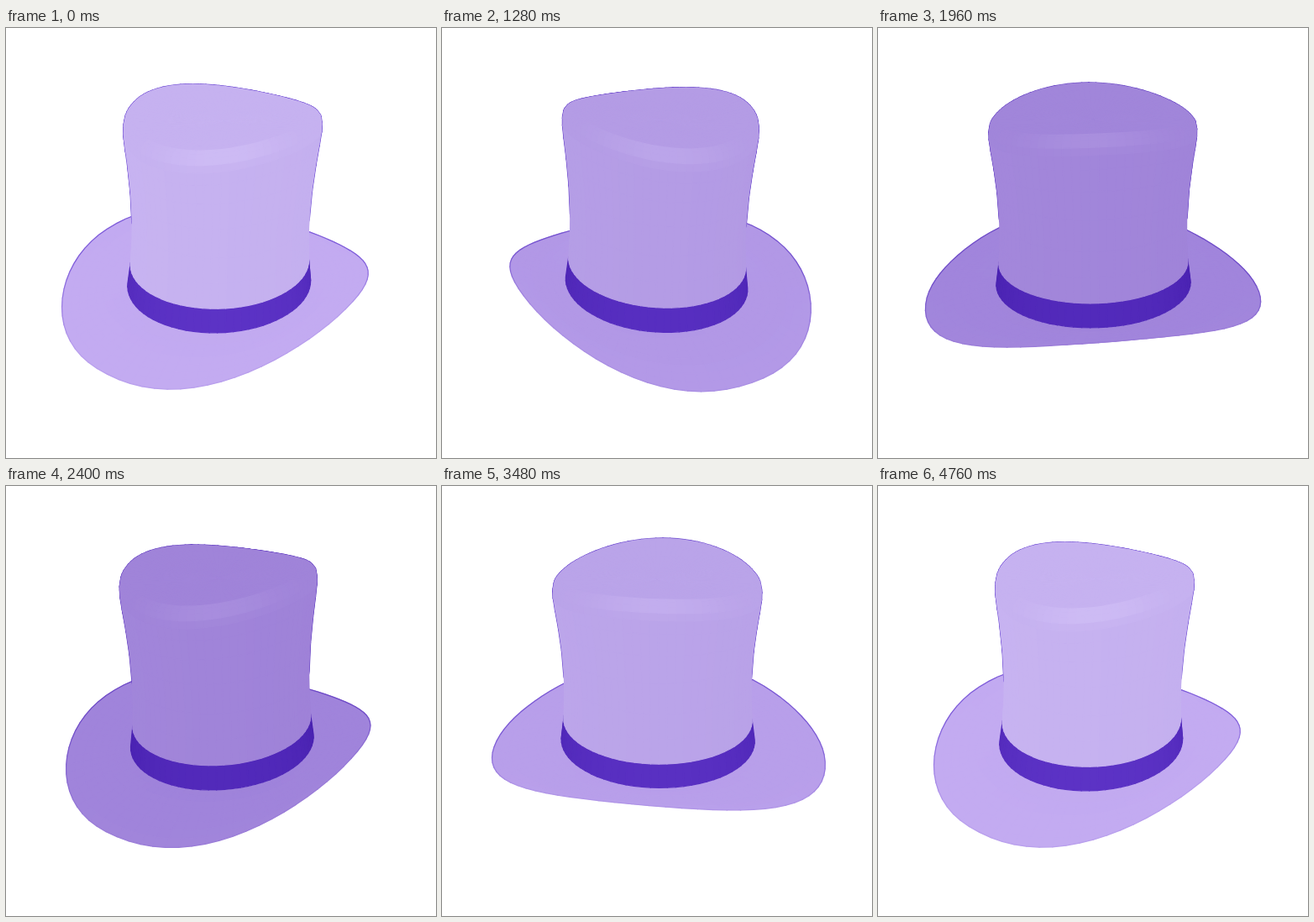
These frames come from a looping animation (512 by 512 pixels, 4.8 s). An HTML page with a canvas:

```html
<!DOCTYPE html>
<html lang="en">
<head>
<meta charset="utf-8">
<title>Turning hat</title>
<style>
html, body { margin: 0; width: 100%; height: 100%; overflow: hidden; background: #fff; }
canvas { display: block; width: 512px; height: 512px; }
</style>
</head>
<body>
<canvas id="stage" width="512" height="512"></canvas>
<script>
const ctx = document.getElementById('stage').getContext('2d');
const FRAME = 40, FRAMES = 120, SEGS = 80;
const DIST = 900, TILT = 28 * Math.PI / 180, LEAN = .0255, PIVOT = 30;
const sinT = Math.sin(TILT), cosT = Math.cos(TILT);
const CROWN = { front: 117.8, side: 107.7, bend: 6.8 };
const BRIM = { front: 203, side: 168, low: -67, rise: 40 };

// Crown profile: relative radius, height, share of the saddle bend.
const PROFILE = [
  [1, -49, 0], [.96, -20.5, 0], [.935, 10, 0], [.923, 40, 0], [.926, 75, .25],
  [.942, 105, .6], [.96, 128, .85], [.969, 142, 1], [.966, 150, 1], [.952, 156.5, 1],
  [.925, 160, 1], [.88, 161, .9], [.75, 158.5, .65], [.55, 155, .35], [.3, 152, .1], [0, 151, 0]
];
const BAND_ROWS = 1, SIDE_ROWS = 7, RIM_ROWS = 11, BRIM_ROWS = 8;

const mix = (a, b, t) => a.map((v, i) => v + (b[i] - v) * t);
const css = c => 'rgb(' + c.map(v => Math.round(Math.max(0, Math.min(255, v)))) + ')';
const TONES = {
  crown: [[160, 132, 217], [198, 178, 240]],
  brim: [[160, 132, 219], [195, 171, 241]],
  band: [[78, 38, 182], [88, 47, 193]],
  line: [[104, 68, 196], [116, 82, 214]]
};

function project(x, near, z) {
  const d = DIST - near * cosT - z * sinT;
  return { x: 256.5 + DIST * x / d, y: 256 - DIST * (z * cosT - near * sinT) / d, d };
}

// The hat leans slightly to one side of the axis it turns on.
function place(side, front, z, turn) {
  const s = Math.sin(turn), c = Math.cos(turn);
  const across = side + LEAN * (z - PIVOT);
  return project(across * c + front * s, front * c - across * s, z - LEAN * side);
}

const bow = v => Math.sign(v) * Math.pow(Math.abs(v), .945);

function crownPoint(row, a, turn) {
  const [k, z, bend] = PROFILE[row];
  return place(CROWN.side * k * Math.sin(a), CROWN.front * k * Math.cos(a),
    z - CROWN.bend * bend * Math.cos(2 * a), turn);
}

function brimPoint(row, a, turn) {
  const s = row / BRIM_ROWS, sin = Math.sin(a), cos = Math.cos(a);
  const edge = BRIM.low + BRIM.rise * Math.pow(Math.abs(sin), 2.4);
  const side = CROWN.side * sin * (1 - s) + BRIM.side * bow(sin) * s;
  const front = CROWN.front * cos * (1 - s) + BRIM.front * bow(cos) * s;
  return place(side, front, -50 + (edge + 50) * s * s, turn);
}

function mesh(rows, point, turn) {
  const grid = [], quads = [];
  for (let r = 0; r <= rows; r++) {
    grid.push([]);
    for (let i = 0; i <= SEGS; i++) grid[r].push(point(r, i / SEGS * 2 * Math.PI, turn));
  }
  for (let r = 0; r < rows; r++) {
    for (let i = 0; i < SEGS; i++) {
      const p = [grid[r][i], grid[r][i + 1], grid[r + 1][i + 1], grid[r + 1][i]];
      const area = (p[2].x - p[0].x) * (p[3].y - p[1].y) - (p[2].y - p[0].y) * (p[3].x - p[1].x);
      quads.push({ p, r, area, view: (i + .5) / SEGS * 2 * Math.PI + turn,
        depth: p.reduce((sum, q) => sum + q.d, 0) });
    }
  }
  return { grid, quads: quads.sort((a, b) => b.depth - a.depth) };
}

function trace(p) {
  ctx.beginPath();
  p.forEach(q => ctx.lineTo(q.x, q.y));
  ctx.closePath();
}

function paint(p, color) {
  trace(p);
  ctx.fillStyle = ctx.strokeStyle = color;
  ctx.lineWidth = 1.3;
  ctx.fill();
  ctx.stroke();
}

function drawBrim(turn, light, line) {
  const { grid, quads } = mesh(BRIM_ROWS, brimPoint, turn);
  for (const q of quads) {
    const tone = light + .05 * Math.cos(q.view) * (q.r / BRIM_ROWS - .5);
    paint(q.p, css(mix(...TONES.brim, tone)));
  }
  const edge = grid[BRIM_ROWS];
  ctx.strokeStyle = line;
  ctx.lineWidth = 1.2;
  for (let i = 0; i < SEGS; i++) {
    const near = Math.cos((i + .5) / SEGS * 2 * Math.PI + turn);
    ctx.globalAlpha = Math.max(.12, Math.min(.9, .75 - near));
    ctx.beginPath();
    ctx.moveTo(edge[i].x, edge[i].y);
    ctx.lineTo(edge[i + 1].x, edge[i + 1].y);
    ctx.stroke();
  }
  ctx.globalAlpha = 1;
}

function drawCrown(turn, light, line) {
  const quads = mesh(PROFILE.length - 1, crownPoint, turn).quads.filter(q => q.area < 0);
  ctx.strokeStyle = line;
  ctx.lineWidth = 2.6;
  for (const q of quads) {
    if (q.r < BAND_ROWS + 2) continue;
    trace(q.p);
    ctx.stroke();
  }
  for (const q of quads) {
    const near = Math.max(0, Math.cos(q.view));
    let tone = light;
    if (q.r < BAND_ROWS) tone += near - .6;
    else if (q.r < SIDE_ROWS) tone -= .04 * Math.sin(q.view);
    else if (q.r < RIM_ROWS) tone += (q.r > SIDE_ROWS ? .2 : .06) * near ** 6;
    paint(q.p, css(mix(...(q.r < BAND_ROWS ? TONES.band : TONES.crown), tone)));
  }
}

function draw(now) {
  const t = Math.floor(now / FRAME) % FRAMES / (FRAMES - 1);
  const spin = 2 * Math.PI * t * t * (3 - 2 * t);
  const turn = spin - 35 * Math.PI / 180;
  const light = Math.pow(.5 + .5 * Math.cos(spin + .15), 1.5);
  const line = css(mix(...TONES.line, light));
  ctx.fillStyle = '#fff';
  ctx.fillRect(0, 0, 512, 512);
  ctx.lineJoin = 'round';
  drawBrim(turn, light, line);
  drawCrown(turn, light, line);
}

let start;
function tick(now) {
  start ??= now;
  draw(now - start);
  requestAnimationFrame(tick);
}
draw(0);
requestAnimationFrame(tick);
</script>
</body>
</html>
```
